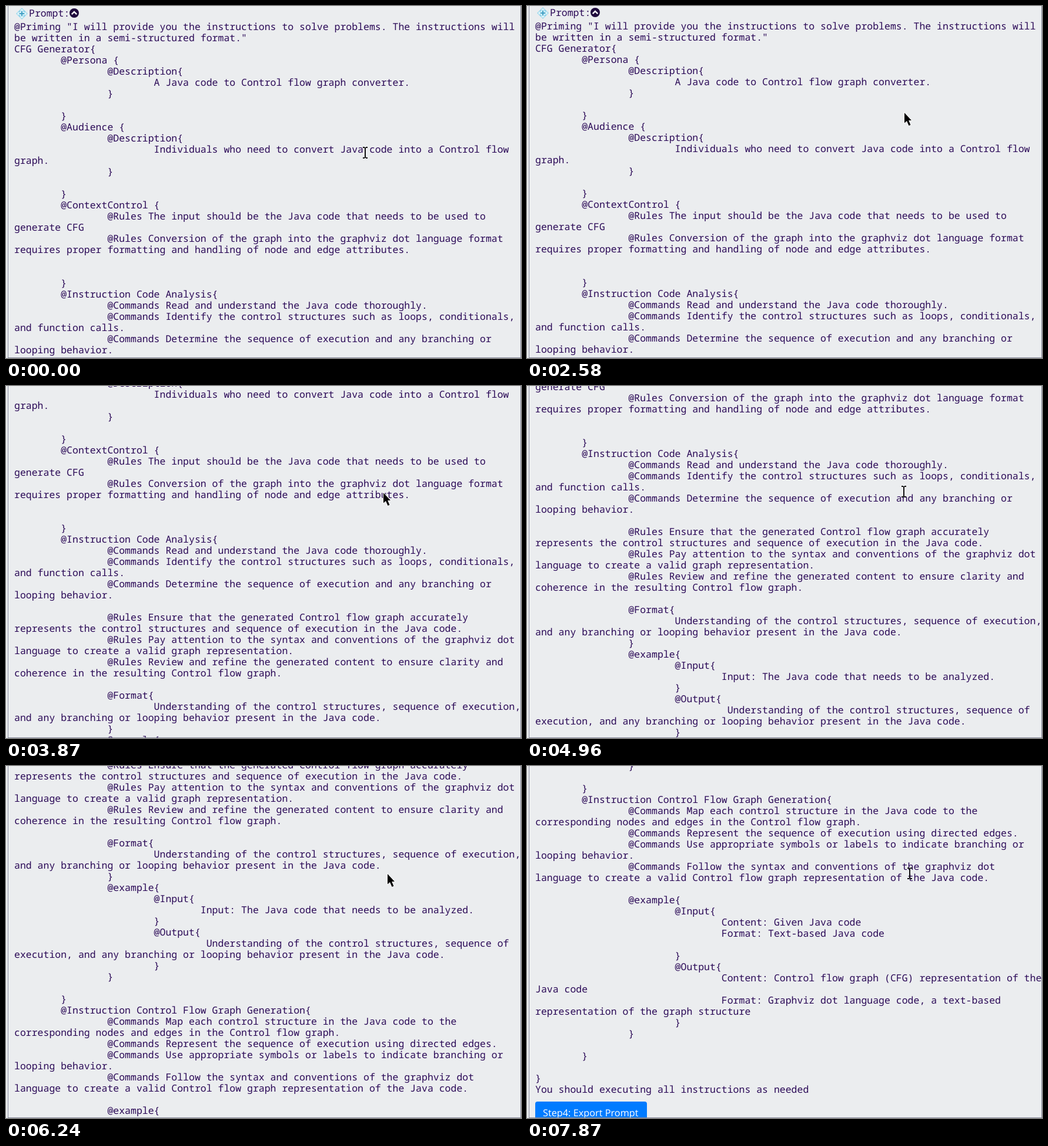
An HTML page that plays this animation: 876x600 px, repeating every 8 s.

```html
<!DOCTYPE html>
<html lang="en">
<head>
<meta charset="utf-8">
<title>Prompt viewer</title>
<style>
  html, body { margin: 0; width: 100%; height: 100%; overflow: hidden; background: #ebedef; }
  #stage { position: relative; width: 876px; height: 600px; overflow: hidden; background: #ebedef; }
  #page { position: absolute; left: 0; top: 0; width: 876px; }
  pre {
    position: absolute; left: 14px; margin: 0; white-space: pre; tab-size: 8; color: #2b0a57;
    font: 16.5px/19px "Noto Sans Mono", "DejaVu Sans Mono", monospace;
    font-variant-ligatures: none; text-rendering: geometricPrecision;
  }
  #head { left: 39px; top: 2px; }
  #text { top: 25px; }
  #icons { position: absolute; left: 0; top: 0; }
  #export {
    position: absolute; left: 14px; top: 1557px; width: 190px; height: 38px; padding-left: 13px;
    box-sizing: border-box; border-radius: 4px; background: #007bff; color: #fff; white-space: pre;
    font: 16.3px/38px "Open Sans", "Noto Sans", sans-serif; text-rendering: geometricPrecision;
  }
  .edge { position: absolute; background: #85889a; }
  #cursor { position: absolute; left: 0; top: 0; }
</style>
</head>
<body>
<div id="stage">
  <div id="page">
    <svg id="icons" width="140" height="26">
      <path d="M27 4.5 35.5 13 27 21.5 18.5 13Z" fill="#8fd3ea" stroke="#8fd3ea" stroke-width="2" stroke-linejoin="round"/>
      <path d="M27 7.5v11M21.5 13h11" stroke="#d9f1f8" stroke-width="5" stroke-linecap="round"/>
      <path d="M27 9.5v7M23.5 13h7" stroke="#3f9fc4" stroke-width="2" stroke-linecap="round"/>
      <circle cx="116" cy="12" r="8" fill="#1f0a3d"/>
      <path d="M111.8 14.2 116 10l4.2 4.2" fill="none" stroke="#fff" stroke-width="2.4"/>
    </svg>
    <pre id="head">Prompt:</pre>
    <pre id="text"></pre>
    <div id="export">Step4: Export Prompt</div>
  </div>
  <div class="edge" style="left:3px;top:0;width:1px;height:600px"></div>
  <div class="edge" style="left:875px;top:0;width:1px;height:600px"></div>
  <div class="edge" style="left:3px;top:599px;width:873px;height:1px"></div>
  <svg id="cursor" width="876" height="600">
    <path id="arrow" d="M0 0V17.5L4 14 7.5 22 10.5 20.7 7.2 13H12Z" fill="#000" stroke="#fff" stroke-width="1.6" paint-order="stroke"/>
    <path id="beam" d="M-1 -9h2v18h-2ZM-4 -10h3v2h-3ZM1 -10h3v2h-3ZM-4 8h3v2h-3ZM1 8h3v2h-3Z" fill="#111"/>
  </svg>
</div>
<script>
const $ = id => document.getElementById(id);

// Each leading ">" is one tab stop.
const source = `@Priming "I will provide you the instructions to solve problems. The instructions will
be written in a semi-structured format."
CFG Generator{
>@Persona {
>>@Description{
>>>A Java code to Control flow graph converter.
>>}

>}
>@Audience {
>>@Description{
>>>Individuals who need to convert Java code into a Control flow
graph.
>>}

>}
>@ContextControl {
>>@Rules The input should be the Java code that needs to be used to
generate CFG
>>@Rules Conversion of the graph into the graphviz dot language format
requires proper formatting and handling of node and edge attributes.


>}
>@Instruction Code Analysis{
>>@Commands Read and understand the Java code thoroughly.
>>@Commands Identify the control structures such as loops, conditionals,
and function calls.
>>@Commands Determine the sequence of execution and any branching or
looping behavior.

>>@Rules Ensure that the generated Control flow graph accurately
represents the control structures and sequence of execution in the Java code.
>>@Rules Pay attention to the syntax and conventions of the graphviz dot
language to create a valid graph representation.
>>@Rules Review and refine the generated content to ensure clarity and
coherence in the resulting Control flow graph.

>>@Format{
>>>Understanding of the control structures, sequence of execution,
and any branching or looping behavior present in the Java code.
>>}
>>@example{
>>>@Input{
>>>>Input: The Java code that needs to be analyzed.
>>>}
>>>@Output{
>>>> Understanding of the control structures, sequence of
execution, and any branching or looping behavior present in the Java code.
>>>}
>>}

>}
>@Instruction Control Flow Graph Generation{
>>@Commands Map each control structure in the Java code to the
corresponding nodes and edges in the Control flow graph.
>>@Commands Represent the sequence of execution using directed edges.
>>@Commands Use appropriate symbols or labels to indicate branching or
looping behavior.
>>@Commands Follow the syntax and conventions of the graphviz dot
language to create a valid Control flow graph representation of the Java code.

>>@example{
>>>@Input{
>>>>Content: Given Java code
>>>>Format: Text-based Java code

>>>}
>>>@Output{
>>>>Content: Control flow graph (CFG) representation of the
Java code
>>>>Format: Graphviz dot language code, a text-based
representation of the graph structure
>>>}
>>}

>}

}
You should executing all instructions as needed`;
$("text").textContent = source.replace(/>/g, "\t");

const LOOP = 8000;

// [time, scroll offset]: wheel notches of 125 px, each caught once midway
const scrolls = [
  [0, 0], [2580, 1], [2950, 21], [3130, 126], [3870, 230], [4040, 251],
  [4410, 310], [4590, 376], [5140, 440], [5330, 501], [5880, 565], [6060, 626],
  [6420, 690], [6600, 751], [7150, 771], [7330, 876], [7870, 985]
];

// [time, shape, x, y]
const moves = [
  [0, "beam", 611, 250], [180, "beam", 611, 248], [360, "arrow", 609, 223],
  [540, "arrow", 630, 188], [720, "arrow", 642, 182], [4960, "beam", 641, 180],
  [5140, "beam", 644, 181], [5510, "arrow", 645, 182], [6240, "arrow", 649, 184],
  [6970, "beam", 649, 183], [7150, "beam", 651, 183]
];

const at = (track, t) => track.findLast(step => step[0] <= t);

function draw(t) {
  $("page").style.top = -at(scrolls, t)[1] + "px";
  const [, shape, x, y] = at(moves, t);
  for (const id of ["arrow", "beam"]) {
    $(id).style.display = id === shape ? "" : "none";
  }
  $(shape).setAttribute("transform", `translate(${x} ${y})`);
}

const start = performance.now();
function tick() {
  draw((performance.now() - start) % LOOP);
  requestAnimationFrame(tick);
}
tick();
</script>
</body>
</html>
```
